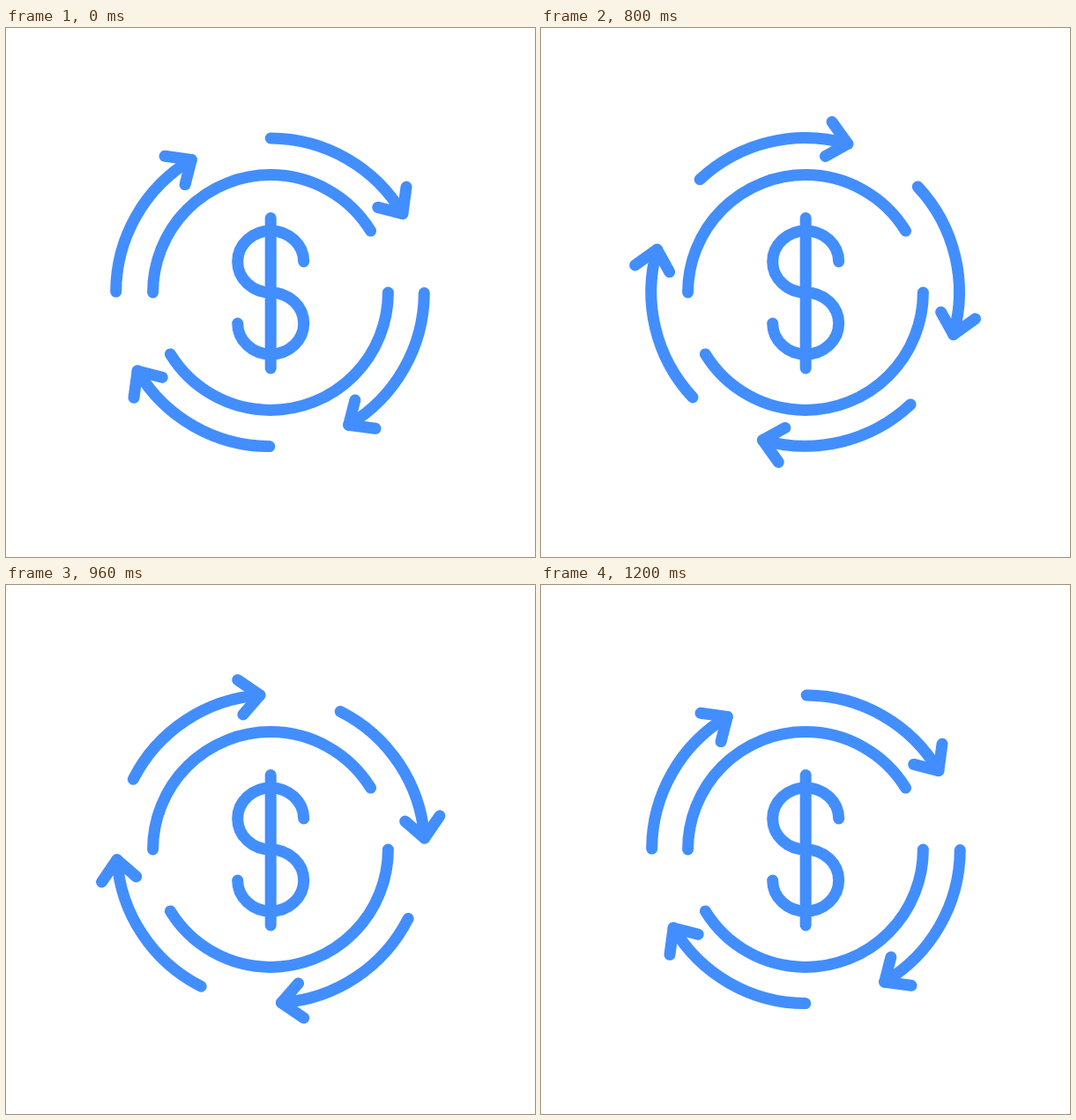
An HTML page with a canvas for the animation above (2 s loop, 600x600 px).

```html
<!DOCTYPE html>
<html lang="en">
<head>
<meta charset="utf-8">
<title>Money cycle</title>
<style>
  html, body { margin: 0; width: 100%; height: 100%; overflow: hidden; background: #fff; }
  canvas { display: block; width: 600px; height: 600px; }
</style>
</head>
<body>
<canvas id="stage" width="600" height="600"></canvas>
<script>
const ctx = document.getElementById('stage').getContext('2d');
const LOOP = 2000, STEP = 40;
const SPIN_START = 600, SPIN_LENGTH = 600;
const { PI } = Math;
const start = performance.now();

function stroke(build) {
  ctx.beginPath();
  build();
  ctx.stroke();
}

function drawCoin() {
  const r = 133.4, gap = 31.6 * PI / 180;
  stroke(() => ctx.arc(300, 300, r, PI, 2 * PI - gap));
  stroke(() => ctx.arc(300, 300, r, 0, PI - gap));
}

function drawDollar() {
  stroke(() => {
    ctx.moveTo(300.2, 215.6);
    ctx.lineTo(300.2, 386);
  });
  stroke(() => {
    ctx.ellipse(300.2, 265, 37.5, 35, 0, 0, PI / 2, true);
    ctx.ellipse(300.2, 335, 37.5, 35, 0, -PI / 2, PI);
  });
}

function drawArrow() {
  stroke(() => ctx.arc(0, 0, 174.8, -PI / 2 + 0.004, -0.535));
  stroke(() => {
    ctx.moveTo(154.5, -119.5);
    ctx.lineTo(150.4, -89.2);
    ctx.lineTo(122.2, -96.4);
  });
}

function drawArrows(angle) {
  ctx.save();
  ctx.translate(300, 299.8);
  ctx.rotate(angle);
  ctx.translate(-0.5, 0);
  for (let i = 0; i < 4; i++) {
    drawArrow();
    ctx.rotate(PI / 2);
  }
  ctx.restore();
}

// Half a turn with a smooth start and stop, advancing in 40 ms steps.
function spinAt(ms) {
  const t = Math.floor(ms / STEP) * STEP;
  const p = Math.min(1, Math.max(0, (t - SPIN_START) / SPIN_LENGTH));
  return PI * p * p * (3 - 2 * p);
}

function render() {
  ctx.fillStyle = '#fff';
  ctx.fillRect(0, 0, 600, 600);
  ctx.strokeStyle = '#428eff';
  ctx.lineWidth = 13;
  ctx.lineCap = ctx.lineJoin = 'round';
  drawCoin();
  drawDollar();
  drawArrows(spinAt((performance.now() - start) % LOOP));
  requestAnimationFrame(render);
}

render();
</script>
</body>
</html>
```
